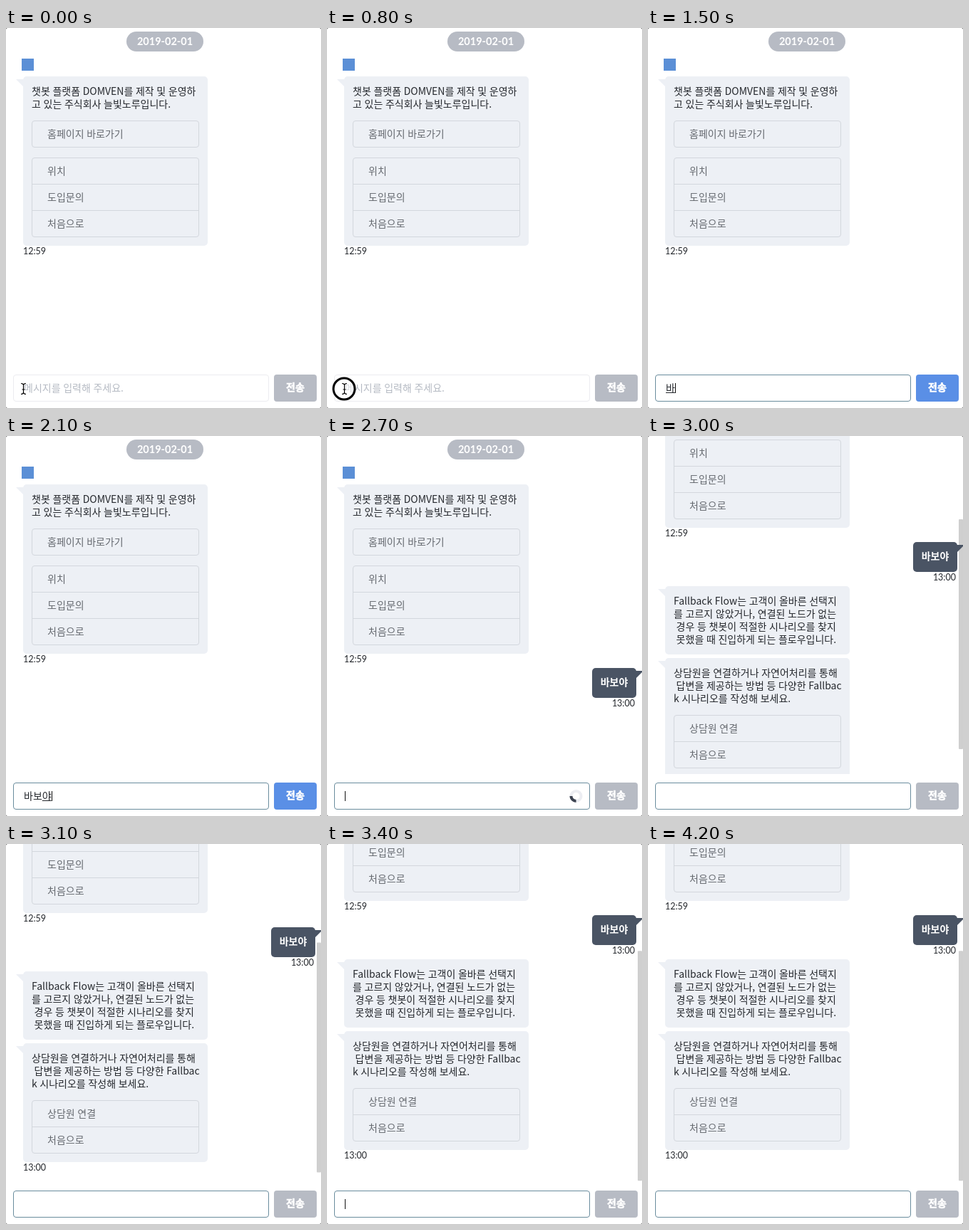
An HTML page that plays this animation: 442 by 534 pixels, repeating every 4.3 s.

```html
<!DOCTYPE html>
<html lang="ko">
<head>
<meta charset="utf-8">
<title>Chat</title>
<style>
  html, body { margin: 0; width: 100%; height: 100%; overflow: hidden; background: #666; }
  svg { display: block; }
  text { font: 14px "Noto Sans CJK KR", "Noto Sans CJK", sans-serif; word-spacing: -.3px; fill: #24272c; white-space: pre; }
  .label { fill: #666a70; }
  .time { font: 12.5px Lato, sans-serif; }
  .date { font: bold 14.5px Lato, sans-serif; fill: #fff; }
  .white { font-weight: bold; fill: #fff; }
  .heavy { stroke: #fff; stroke-width: .6; }
  .bubble { fill: #edf0f5; }
  .mine { fill: #4a5464; }
  .line { fill: none; stroke: #d3d7dd; }
</style>
</head>
<body>
<svg width="442" height="534" viewBox="0 0 442 534">
  <defs>
    <clipPath id="view"><rect width="442" height="475"/></clipPath>
    <path id="beam" d="M-3 -7.5Q0 -7.5 .5 -5.5Q1 -7.5 4 -7.5M.5 -5.5V5.5M-3 7.5Q0 7.5 .5 5.5Q1 7.5 4 7.5M-1.5 1H2.5"/>
  </defs>
  <rect width="442" height="534" rx="2.5" fill="#fff"/>
  <g clip-path="url(#view)">
    <rect id="thumb" x="436" width="6" height="323" rx="1" fill="#cfcfcf"/>
    <g id="chat"></g>
  </g>
  <rect id="input" x="10.5" y="487.5" width="358" height="37" rx="3.5" fill="#fff"/>
  <text id="hint" x="25" y="511" style="fill:#b5bac3">메시지를 입력해 주세요.</text>
  <text id="typed" x="25" y="511"></text>
  <path id="underline" stroke="#24272c"/>
  <rect id="caret" y="499" width="1" height="14" fill="#111"/>
  <g id="spinner" fill="none" stroke-width="4">
    <circle r="7" stroke="#ecedf2"/>
    <path d="M0 7A7 7 0 0 1 -7 0" stroke="#3c4250"/>
  </g>
  <rect id="send" x="376" y="487" width="60" height="38" rx="4"/>
  <text class="white heavy" x="406" y="510" text-anchor="middle">전송</text>
  <g id="pointer" transform="translate(24 507)" fill="none">
    <circle id="click" r="15" fill="#fff" fill-opacity=".5" stroke="#000" stroke-width="3"/>
    <use href="#beam" stroke="#fff" stroke-width="3"/>
    <use href="#beam" stroke="#000" stroke-width="1.2"/>
  </g>
</svg>
<script>
const LOOP = 4300, STEP = 100, SCROLL = 226, EM = 12.88;
const CLICK = 500, FOCUS = 900, TYPE = 1400, SEND = 2300, REPLY = 2800;
const KEYS = ['ㅂ', '바', '밥', '바보', '바봉', '바보야'];
const CLICK_ALPHA = [.35, .7, 1, 1, .5];
const $ = id => document.getElementById(id);
const set = (id, attrs) => {
  for (const name in attrs) $(id).setAttribute(name, attrs[name]);
};
const show = (id, on) => $(id).style.display = on ? '' : 'none';

const text = (x, y, s, cls = '', extra = '') =>
  `<text x="${x}" y="${y}" class="${cls}" ${extra}>${s}</text>`;

const bubble = (y, height, lines) =>
  `<rect class="bubble" x="24" y="${y}" width="259" height="${height}" rx="5"/>
   <path class="bubble" d="M14 ${y + 4}H30L24 ${y + 14}Z"/>` +
  lines.map((s, i) => text(36, y + 26 + i * 18, s)).join('');

const buttons = (y, labels) =>
  `<rect class="line" x="36.5" y="${y + .5}" width="234" height="${labels.length * 37}" rx="3.5"/>` +
  labels.map((s, i) =>
    (i ? `<path class="line" d="M36 ${y + i * 37 + .5}h235"/>` : '') +
    text(58, y + 24 + i * 37, s, 'label')).join('');

$('chat').innerHTML = `
  <rect x="169" y="5" width="108" height="28" rx="14" fill="#b7bbc4"/>
  ${text(223, 24, '2019-02-01', 'date', 'text-anchor="middle"')}
  <rect x="22" y="43" width="17" height="17" fill="#5b8fd6"/>
  ${bubble(68, 238, ['챗봇 플랫폼 DOMVEN를 제작 및 운영하', '고 있는 주식회사 늘빛노루입니다.'])}
  ${buttons(130, ['홈페이지 바로가기'])}
  ${buttons(182, ['위치', '도입문의', '처음으로'])}
  ${text(24, 318, '12:59', 'time')}
  <g id="mine">
    <rect class="mine" x="372" y="326" width="62" height="42" rx="5"/>
    <path class="mine" d="M428 330H444L434 340Z"/>
    ${text(403, 351, '바보야', 'white', 'text-anchor="middle"')}
    ${text(432, 380, '13:00', 'time', 'text-anchor="end"')}
  </g>
  <g id="reply">
    ${bubble(388, 96, ['Fallback Flow는 고객이 올바른 선택지', '를 고르지 않았거나, 연결된 노드가 없는',
      ' 경우 등 챗봇이 적절한 시나리오를 찾지', ' 못했을 때 진입하게 되는 플로우입니다.'])}
    ${bubble(489, 167, ['상담원을 연결하거나 자연어처리를 통해', ' 답변을 제공하는 방법 등 다양한 Fallbac',
      'k 시나리오를 작성해 보세요.'])}
    ${buttons(569, ['상담원 연결', '처음으로'])}
    ${text(24, 668, '13:00', 'time')}
  </g>`;

function draw(t) {
  const focused = t >= FOCUS, replied = t >= REPLY;
  const typing = t >= TYPE && t < SEND;
  const waiting = t >= SEND && !replied;

  // Ease-out scroll to the newest message
  const p = Math.min(1, Math.max(0, (t - 2723) / 520));
  const scroll = replied ? Math.round(SCROLL * (1 - (1 - p) ** 2)) : 0;
  set('chat', { transform: `translate(0 ${-scroll})` });
  set('thumb', { y: scroll * 475 / (475 + SCROLL) - 3, opacity: Math.min(1, .6 + (t - REPLY) / 400) });
  show('thumb', replied);
  show('mine', t >= SEND);
  show('reply', replied);

  const word = typing ? KEYS[Math.min(KEYS.length - 1, (t - TYPE) / STEP)] : '';
  const end = 25 + word.length * EM;
  $('typed').textContent = word;
  set('underline', { d: word ? `M${end - EM} 512.5H${end}` : '' });
  set('caret', { x: Math.round(end) });
  show('caret', focused && (t < 2900 || (t >= 3400 && t < 3900)));
  show('hint', !focused);
  set('input', { stroke: focused ? '#6a8c9d' : '#ececf0' });
  set('send', { fill: typing ? '#5a8fe6' : '#b7bbc4' });

  show('spinner', waiting);
  set('spinner', { transform: `translate(349.5 506) rotate(${(t - 2700) * .36})` });
  show('pointer', t < TYPE);
  set('click', { opacity: CLICK_ALPHA[(t - CLICK) / STEP] || 0 });
}

function tick() {
  draw(Math.floor(performance.now() % LOOP / STEP) * STEP);
  requestAnimationFrame(tick);
}
tick();
</script>
</body>
</html>
```
